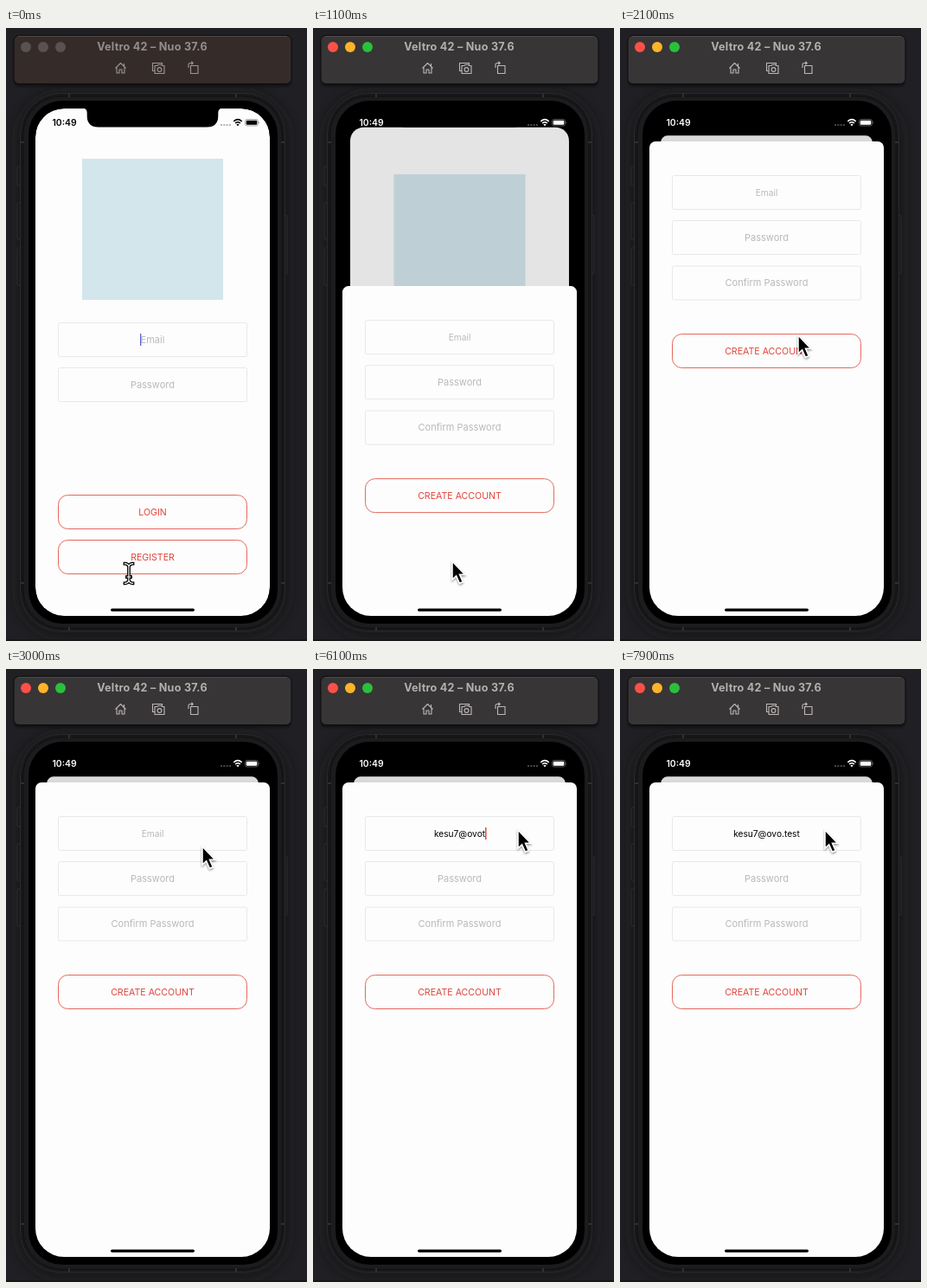
These frames come from a looping animation (348x708 px, 8 s). An HTML page:

```html
<!DOCTYPE html>
<html lang="en">
<head>
<meta charset="utf-8">
<title>Sign up</title>
<style>
  html, body { margin: 0; width: 100%; height: 100%; overflow: hidden; background: #1f1f23; }
  svg { display: block; width: 348px; height: 708px; }
  text { font: 11px Inter, "Open Sans", sans-serif; text-anchor: middle; }
  .title { font-size: 12.6px; font-weight: 700; fill: #b4b0b0; letter-spacing: .25px; }
  .clock { font-size: 10.4px; font-weight: 600; }
  .field rect { fill: #fdfdfd; stroke: #e8e8e8; }
  .field text { fill: #b9b9bb; }
  .button rect { fill: #fdfdfd; stroke: #e4695d; }
  .button text { font-size: 10.6px; fill: #e0443a; }
  #entry { font-size: 10.2px; }
  .icon { fill: none; stroke: #bdb8b7; stroke-width: 1.1; stroke-linejoin: round; }
</style>
</head>
<body>
<svg viewBox="0 0 348 708">
  <defs>
    <clipPath id="screen"><rect x="34" y="93" width="271" height="586" rx="33"/></clipPath>
    <filter id="soft" x="-50%" y="-50%" width="200%" height="200%">
      <feDropShadow dx="0" dy="1.5" stdDeviation="1.2" flood-opacity=".45"/>
    </filter>
    <filter id="glow" x="-20%" y="-20%" width="140%" height="140%">
      <feGaussianBlur stdDeviation="7"/>
    </filter>
    <path id="beamShape" d="M-4.500-11.300Q-1-11.300 0-8Q1-11.300 4.500-11.300M-4.500 11.300Q-1 11.300 0 8Q1 11.300 4.500 11.300M0-8V8M-2 4H2"/>
  </defs>

  <rect width="348" height="708" fill="#202024"/>
  <rect x="12" y="74" width="316" height="630" rx="52" fill="#131315" opacity=".6" filter="url(#glow)"/>
  <rect y="706" width="348" height="2" fill="#17171a"/>

  <!-- window bar -->
  <rect x="9" y="9" width="321" height="58" rx="6" fill="#0d0d0f" opacity=".6" filter="url(#soft)"/>
  <rect id="bar" x="9" y="8.5" width="321" height="56" rx="6" stroke="#0c0b0c"/>
  <path d="M14 9.5H325" stroke="#5b5453" opacity=".7"/>
  <g id="lights">
    <circle cx="23" cy="22" r="6"/><circle cx="43" cy="22" r="6"/><circle cx="63" cy="22" r="6"/>
  </g>
  <g id="tools">
    <text class="title" x="169" y="26">Veltro 42 – Nuo 37.6</text>
    <g class="icon">
      <path d="M126.500 46.500L132.500 40.500L138.500 46.500M128 45.500V52H131V48H134V52H137V45.500M136.500 44V41"/>
      <path d="M171.500 49.500H169.500V40.500H180.500V42.500M172 43.500H175L176 42.300H179.500L180.500 43.500H183V52.500H172z"/>
      <circle cx="177.500" cy="48" r="2.400"/>
      <path d="M213.500 43.500H222V52.500H213.500zM211 46V42.500Q211 40.500 213 40.500H216M214.300 38.700L216.200 40.500L214.300 42.300"/>
    </g>
  </g>

  <!-- phone body -->
  <g fill="#1a1a1c" stroke="#343437" stroke-width=".8">
    <rect x="13" y="160" width="6" height="22" rx="1.500"/>
    <rect x="13" y="202" width="6" height="42" rx="1.500"/>
    <rect x="13" y="254" width="6" height="43" rx="1.500"/>
    <rect x="319" y="216" width="6" height="68" rx="1.500"/>
  </g>
  <rect x="16.500" y="75.500" width="306" height="621" rx="47" fill="#171719" stroke="#2a2a2d"/>
  <rect x="20" y="79" width="299" height="614" rx="44" fill="#1c1c1e" stroke="#111113"/>
  <path fill="#303033" d="M72 76h2v4h-2zM265 76h2v4h-2zM72 692h2v4h-2zM265 692h2v4h-2zM17 131h4v2h-4zM318 131h4v2h-4zM17 640h4v2h-4zM318 640h4v2h-4z"/>
  <rect x="26" y="84" width="288" height="604" rx="39"/>

  <g clip-path="url(#screen)">
    <g id="card">
      <rect id="cardBack" x="34" y="93" width="271" height="586" fill="#fdfdfd"/>
      <rect x="88" y="151" width="163" height="163" fill="#d3e6ec"/>
      <g id="login"></g>
      <rect id="blueCaret" x="155" y="353" width="1.300" height="14" fill="#5566d0"/>
      <rect id="dim" x="34" y="93" width="271" height="586"/>
    </g>
    <g id="sheet">
      <rect x="34" y="131" width="271" height="640" rx="7" fill="#fdfdfd"/>
      <g id="signup"></g>
      <text id="entry" x="169.500" y="193.500"></text>
      <rect id="caret" y="183" width="1.400" height="14" fill="#e23d2e"/>
    </g>
  </g>

  <path d="M89 92.500Q93.700 93 93.700 98V101.500Q93.700 114.500 107 114.500H232Q245.300 114.500 245.300 101.500V98Q245.300 93 250 92.500z"/>
  <g id="status">
    <text class="clock" x="67.500" y="113">10:49</text>
    <path d="M248 112h2M251.300 112h2M254.600 112h2M257.900 112h2" stroke="currentColor" stroke-width="1.800" opacity=".28"/>
    <path d="M263.300 107.800Q268 103.600 272.700 107.800M265.100 110Q268 107.500 270.900 110" fill="none" stroke="currentColor" stroke-width="1.600"/>
    <path d="M268 113.300l-1.700-1.900q1.700-1.300 3.400 0z"/>
    <rect x="276.500" y="105.500" width="15" height="7.500" rx="2.200" fill="none" stroke="currentColor" stroke-width=".8" opacity=".4"/>
    <rect x="277.700" y="106.700" width="12.600" height="5.100" rx="1.200"/>
    <path d="M292.600 107.800q1.600 1.400 0 2.900z" opacity=".5"/>
  </g>
  <rect x="121" y="670.500" width="97" height="3.200" rx="1.600"/>

  <g id="pointer">
    <g id="beam" fill="none" stroke-linecap="square">
      <use href="#beamShape" stroke="#000" stroke-width="3.800"/>
      <use href="#beamShape" stroke="#fff" stroke-width="1.200"/>
    </g>
    <path id="arrow" d="M0 0V21L4.600 16.700L8.400 25.300L12.200 23.600L8.500 15.300H14.600z" stroke="#fff" stroke-width="1.500" filter="url(#soft)"/>
  </g>
</svg>

<script>
const LOOP = 8000, STEP = 100;
const $ = id => document.getElementById(id);
const set = (id, attrs) => {
  for (const key in attrs) $(id).setAttribute(key, attrs[key]);
};
const show = (id, on) => set(id, { visibility: on ? 'visible' : 'hidden' });
const mix = (a, b, p) => a + (b - a) * p;
const clamp = v => Math.min(1, Math.max(0, v));

const box = (kind, y, label, size) => `<g class="${kind}">
  <rect x="60.5" y="${y}" width="218" height="39" rx="${kind === 'button' ? 11 : 2}"/>
  <text x="169.5" y="${y + 23.3}" style="font-size:${size}px">${label}</text></g>`;
const field = (y, label, size = 11) => box('field', y, label, size);
const button = (y, label) => box('button', y, label, 10.6);

$('login').innerHTML = field(340.5, 'Email') + field(392.5, 'Password') +
  button(539.5, 'LOGIN') + button(591.5, 'REGISTER');
$('signup').innerHTML = field(170.5, 'Email', 10.2) + field(222.5, 'Password') +
  field(275, 'Confirm Password') + button(353.5, 'CREATE ACCOUNT');
const hint = document.querySelector('#signup text');

// time, x, y
const path = [[100, 142, 630], [800, 161, 616], [1400, 161, 616], [1800, 192, 382], [2100, 206, 355],
  [2300, 208, 350], [2900, 227, 205], [3100, 227, 205], [3600, 237, 186]];

// '<' removes the last letter
const keys = 'kesu7@ovot<.test';
const keyTimes = [4000, 4100, 4200, 4300, 4500, 5000, 5300, 5600, 5800, 6100,
  6300, 6500, 6800, 7000, 7200, 7300];

function pointerAt(t) {
  const i = path.findIndex(p => p[0] > t);
  if (i === 0) return path[0].slice(1);
  if (i < 0) return path[path.length - 1].slice(1);
  const [a, b] = [path[i - 1], path[i]];
  const p = (t - a[0]) / (b[0] - a[0]);
  const e = p * p * (3 - 2 * p);
  return [mix(a[1], b[1], e), mix(a[2], b[2], e)];
}

function typed(t) {
  return [...keys].reduce((s, k, i) =>
    keyTimes[i] > t ? s : k === '<' ? s.slice(0, -1) : s + k, '');
}

// critically damped spring, 0 to 1
function spring(t) {
  const x = Math.max(0, t - 963.5) * 0.0177;
  return 1 - (1 + x) * Math.exp(-x);
}

function render(t) {
  const active = t >= 400;
  const colors = active ? ['#fe5049', '#fdb42a', '#2ac03c'] : Array(3).fill('#5a5250');
  [...$('lights').children].forEach((c, i) => c.setAttribute('fill', colors[i]));
  set('bar', { fill: active ? '#383536' : '#352c2a' });
  set('tools', { opacity: active ? 1 : 0.75 });
  show('blueCaret', t < 500);

  const p = spring(t);
  const scale = mix(1, 245 / 271, p);
  set('card', { transform: `translate(169.5 ${93 + 31.3 * p}) scale(${scale}) translate(-169.5 -93)` });
  for (const id of ['cardBack', 'dim']) set(id, { rx: mix(33, 8, p) / scale });
  set('dim', { opacity: 0.14 * p });
  set('sheet', { transform: `translate(0 ${548 * (1 - p)})` });
  const shade = Math.round(255 * clamp((p - 0.15) / 0.5));
  const ink = `rgb(${shade},${shade},${shade})`;
  set('status', { fill: ink, color: ink });

  const text = typed(t);
  $('entry').textContent = text;
  hint.style.visibility = text ? 'hidden' : 'visible';
  const half = text ? $('entry').getComputedTextLength() / 2 : -13;
  set('caret', { x: 169.5 + half });
  show('caret', t >= 3600 && t < 7600);

  const [x, y] = pointerAt(t);
  set('pointer', { transform: `translate(${x} ${y})` });
  show('beam', !active);
  show('arrow', active);
}

const start = performance.now();
function frame() {
  const t = (performance.now() - start) % LOOP;
  render(Math.floor(t / STEP) * STEP);
  requestAnimationFrame(frame);
}
frame();
</script>
</body>
</html>
```
